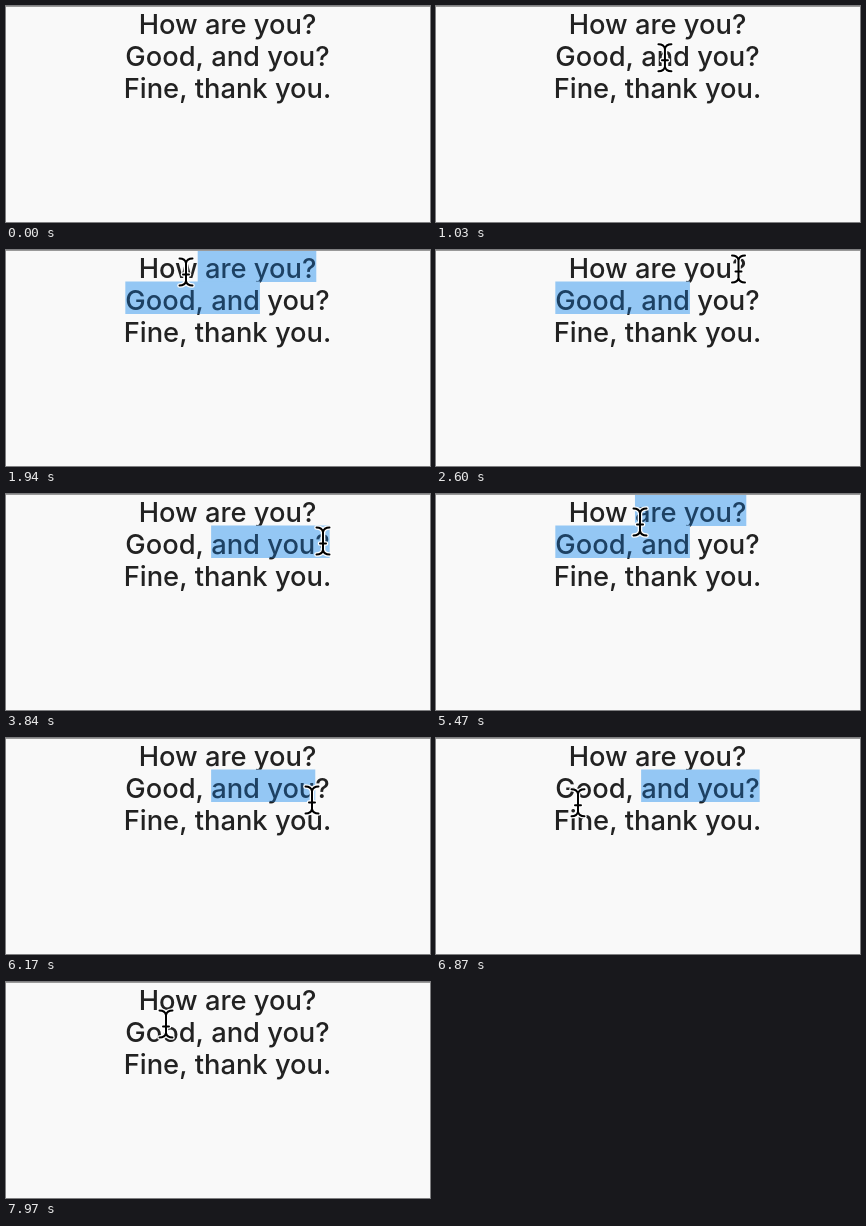
Recreate the animation shown at these times as an HTML page with a canvas. Size 424 by 216 pixels, loop 8000 ms.

```html
<!DOCTYPE html>
<html lang="en">
<head>
<meta charset="utf-8">
<title>Word selection</title>
<style>
  html, body { margin: 0; width: 100%; height: 100%; overflow: hidden; background: #f9f9f9; }
  canvas { display: block; width: 424px; height: 216px; }
</style>
</head>
<body>
<canvas id="stage"></canvas>
<script>
const LOOP = 8000, WIDTH = 424, HEIGHT = 216, LINE = 32, CENTER = 221.5;
const PAPER = '#f9f9f9', INK = '#222', SELECTED_INK = '#1d4163', HIGHLIGHT = '#94c7f4';
const ENTER_AT = 40, SELECT_AT = 1240, CLEAR_AT = 7750;

// Turning points of the pointer: time, x, y
const turns = [
  [ENTER_AT, 306, -12], [500, 150, 40], [1070, 230, 52], [SELECT_AT, 230, 52],
  [1600, 300, 24], [1940, 180, 22], [2600, 302.5, 19], [2800, 302.5, 19],
  [3250, 331, 45], [3840, 317, 47], [4350, 150, 81], [4770, 212, 52],
  [5200, 180, 20], [6170, 306, 62], [6550, 150, 84], [7000, 140, 60],
  [7450, 276, 44], [7970, 160, 42]
];

const canvas = document.getElementById('stage');
const ctx = canvas.getContext('2d');
const ratio = window.devicePixelRatio || 1;
canvas.width = WIDTH * ratio;
canvas.height = HEIGHT * ratio;
ctx.scale(ratio, ratio);
ctx.font = '500 27.3px Inter, sans-serif';

// Each line knows its word boundaries
const lines = ['How are you?', 'Good, and you?', 'Fine, thank you.'].map(text => {
  const measure = s => ctx.measureText(s).width;
  const left = CENTER - measure(text) / 2;
  const stops = [left];
  let prefix = '';
  for (const token of text.match(/\w+|\W/g)) {
    prefix += token;
    stops.push(left + measure(prefix));
  }
  return { text, left, stops, right: stops[stops.length - 1] };
});

// "and" stays selected while the other end follows the pointer
const andStart = { row: 1, x: lines[1].stops[3] };
const andEnd = { row: 1, x: lines[1].stops[4] };
const isBefore = (a, b) => a.row < b.row || (a.row === b.row && a.x < b.x);

function pointerAt(time) {
  const next = turns.findIndex(turn => turn[0] > time);
  const [t1, x1, y1] = turns.at(next);
  const [t0, x0, y0] = turns.at(next < 0 ? -1 : Math.max(0, next - 1));
  const p = t1 > t0 ? (time - t0) / (t1 - t0) : 1;
  const eased = p * p * (3 - 2 * p);
  return { x: x0 + (x1 - x0) * eased, y: y0 + (y1 - y0) * eased };
}

function nearestStop({ x, y }) {
  const row = Math.min(2, Math.max(0, Math.floor(y / LINE)));
  const distance = stop => Math.abs(stop - x - 1);
  const stop = lines[row].stops.reduce((best, s) => distance(s) < distance(best) ? s : best);
  return { row, x: stop };
}

function drawLine(line, row, color) {
  ctx.fillStyle = color;
  ctx.fillText(line.text, line.left, 28 + row * LINE);
}

function drawSelection(pointer) {
  const focus = nearestStop(pointer);
  const start = isBefore(focus, andStart) ? focus : andStart;
  const end = isBefore(andEnd, focus) ? focus : andEnd;
  for (let row = start.row; row <= end.row; row++) {
    const line = lines[row];
    const left = row === start.row ? start.x : line.left;
    const right = row === end.row ? end.x : line.right;
    ctx.save();
    ctx.beginPath();
    ctx.rect(left, row * LINE - 0.5, right - left, LINE + 0.5);
    ctx.clip();
    ctx.fillStyle = HIGHLIGHT;
    ctx.fillRect(0, row * LINE - 1, WIDTH, LINE + 1);
    drawLine(line, row, SELECTED_INK);
    ctx.restore();
  }
}

const beam = new Path2D(
  'M-6.5-13.5Q-1-13.5 0-9Q1-13.5 6.5-13.5M0-9V9M-6.5 13.5Q-1 13.5 0 9Q1 13.5 6.5 13.5M-3 2.5H3');

function drawPointer({ x, y }) {
  ctx.save();
  ctx.translate(x, y);
  ctx.lineCap = 'round';
  for (const [color, width] of [['#fff', 4.6], ['#000', 2]]) {
    ctx.strokeStyle = color;
    ctx.lineWidth = width;
    ctx.stroke(beam);
  }
  ctx.restore();
}

function draw(time) {
  ctx.fillStyle = PAPER;
  ctx.fillRect(0, 0, WIDTH, HEIGHT);
  lines.forEach((line, row) => drawLine(line, row, INK));
  const pointer = pointerAt(time);
  if (time >= SELECT_AT && time < CLEAR_AT) drawSelection(pointer);
  ctx.fillStyle = '#999';
  ctx.fillRect(0, 0, WIDTH, 1);
  if (time >= ENTER_AT) drawPointer(pointer);
}

const began = performance.now();
function tick() {
  draw((performance.now() - began) % LOOP);
  requestAnimationFrame(tick);
}
tick();
</script>
</body>
</html>
```
